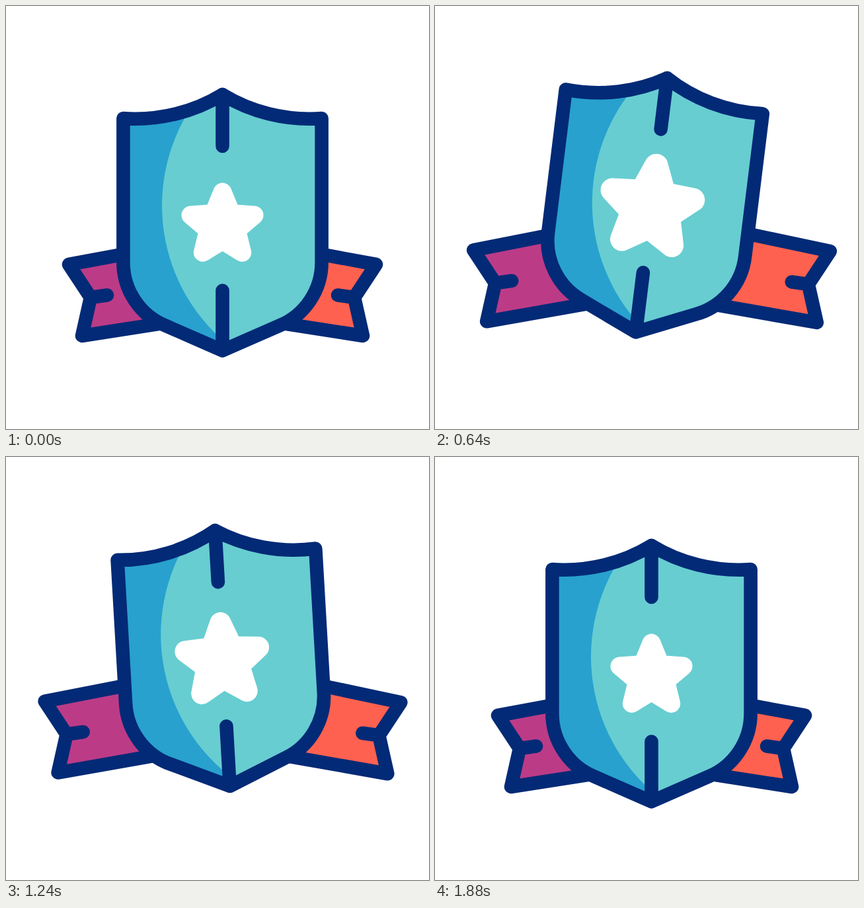
These frames come from a looping animation (640x640 px, 1.96 s). An HTML page:

```html
<!DOCTYPE html>
<html lang="en">
<head>
<meta charset="utf-8">
<title>Shield badge</title>
<style>
  html, body { margin: 0; width: 100%; height: 100%; overflow: hidden; background: #fff; }
  svg { display: block; width: 100vw; height: 100vh; }
  .line { stroke: #032a76; stroke-width: 20.6; stroke-linecap: round; stroke-linejoin: round; }
</style>
</head>
<body>
<svg viewBox="0 0 640 640">
  <defs>
    <path id="outline" d="M327.5 134 C285 160 232 174 177.4 170 V388 C177.4 431 204 468 240 483 L327.5 521.3
      L415 483 C451 468 477.6 431 477.6 388 V170 C423 174 370 160 327.5 134 Z"/>
    <clipPath id="inside"><use href="#outline"/></clipPath>
  </defs>
  <path id="left" class="line" fill="#bc3b87"/>
  <g transform="translate(655 0) scale(-1 1)">
    <path id="right" class="line" fill="#ff6150"/>
  </g>
  <g id="shield">
    <use href="#outline" fill="#28a1ce"/>
    <circle cx="508" cy="302" r="272" fill="#67cdd1" clip-path="url(#inside)"/>
    <use href="#outline" class="line" fill="none"/>
    <path class="line" fill="none" d="M327.5 134 V212 M327.5 430.5 V521"/>
    <path id="star" fill="#fff" stroke="#fff" stroke-width="28" stroke-linejoin="round"/>
  </g>
</svg>
<script>
const LOOP = 1960, STEP = 40;
const $ = id => document.getElementById(id);

// Eased 0 to 1 between two times.
function ease(t, from, to) {
  const x = Math.min(1, Math.max(0, (t - from) / (to - from)));
  return x * x * (3 - 2 * x);
}

// Eases up to 1, holds, and eases back to 0.
const pulse = (t, up, top, leave, down) => ease(t, up, top) - ease(t, leave, down);

const lift = t => -36.7 * pulse(t, 230, 860, 975, 1615);
const grow = t => 1 + 0.425 * pulse(t, 265, 885, 885, 1480);
const spread = t => pulse(t, 110, 850, 1015, 1785);
const tilt = t => 7.15 * pulse(t, 80, 610, 610, 1090) - 4.1 * pulse(t, 610, 1090, 1090, 1620);

function starPath(outer, inner) {
  const points = Array.from({ length: 10 }, (_, i) => {
    const r = i % 2 ? inner : outer, a = i * Math.PI / 5;
    return `${r * Math.sin(a)} ${-r * Math.cos(a)}`;
  });
  return `M${points.join('L')}Z`;
}

function ribbonPath(dx, dy, topSlope, bottomSlope) {
  const at = (x, y) => `${x + dx} ${y + dy}`;
  return `M${at(245, 391 - 150 * topSlope)} L${at(95, 391)} L${at(128, 441)} L${at(115, 499)}`
    + `L${at(285, 499 - 170 * bottomSlope)} M${at(128, 441)} L${at(153, 437.5)}`;
}

function draw(t) {
  const p = spread(t), low = 0.155 + 0.026 * p;
  $('left').setAttribute('d', ribbonPath(-45.8 * p, -27 * p, 0.185 + 0.013 * p, low));
  $('right').setAttribute('d', ribbonPath(-47 * p, -24.9 * p, 0.185 + 0.033 * p, low));
  $('shield').setAttribute('transform', `translate(0 ${lift(t)}) rotate(${tilt(t)} 327.5 327.5)`);
  $('star').setAttribute('transform', `translate(327.5 332.1) scale(${grow(t)})`);
}

$('star').setAttribute('d', starPath(50.5, 22.5));
const start = performance.now();
function tick() {
  const t = (performance.now() - start) % LOOP;
  draw(Math.floor(t / STEP) * STEP);
  requestAnimationFrame(tick);
}
tick();
</script>
</body>
</html>
```
